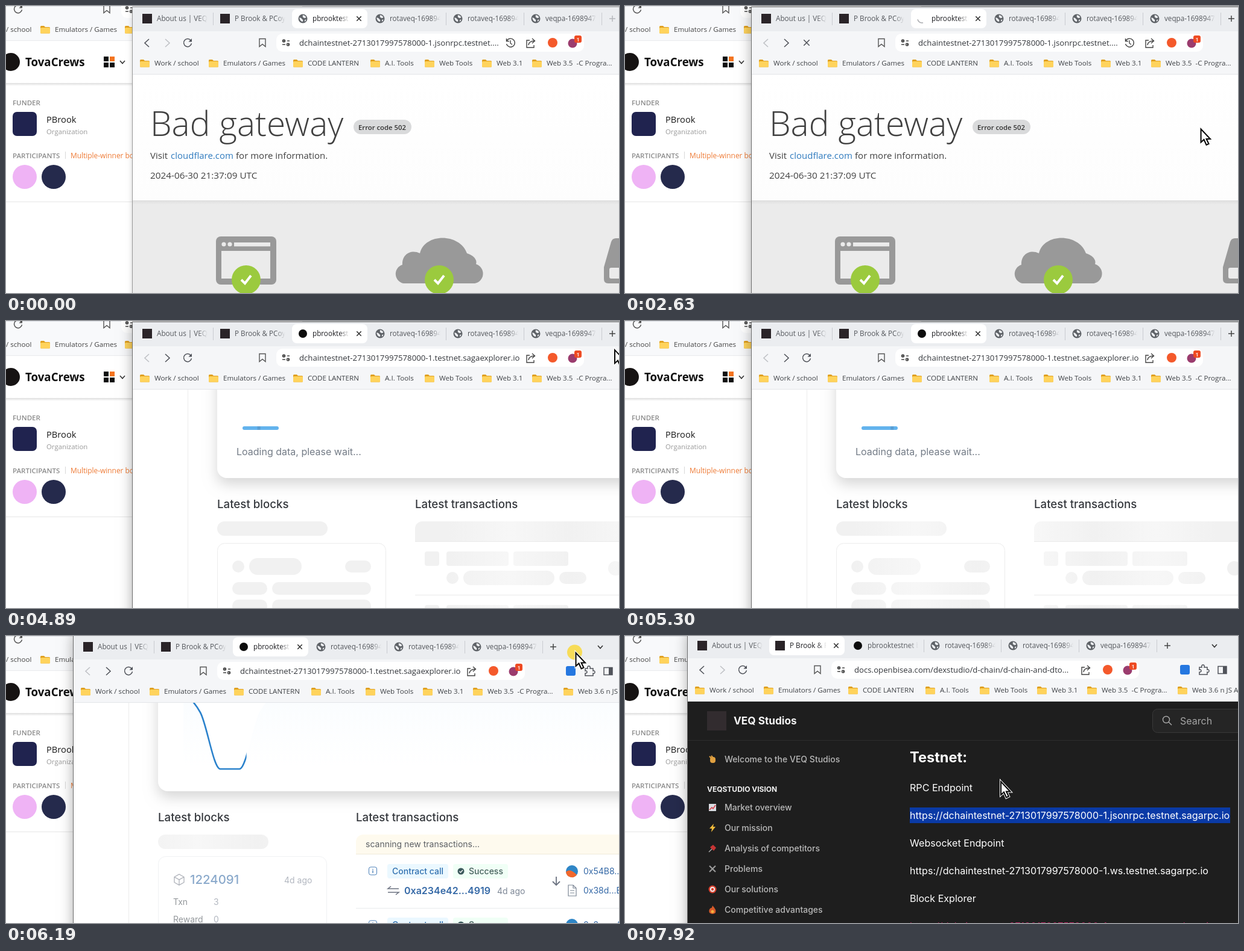
An HTML page with a canvas for the animation above (7990 ms loop, 1016 px wide and 477 px high).

```html
<!DOCTYPE html>
<html lang="en">
<head>
<meta charset="utf-8">
<title>Browser session</title>
<style>
html, body { margin: 0; width: 100%; height: 100%; overflow: hidden; background: #fff; }
canvas { display: block; width: 1016px; height: 477px; }
</style>
</head>
<body>
<canvas id="stage" width="1016" height="477"></canvas>
<script>
const ctx = document.getElementById('stage').getContext('2d');
const LOOP = 7990;
const UI = '"Open Sans", "Noto Sans", sans-serif';
const INTER = 'Inter, sans-serif';
const HOST = 'dchaintestnet-2713017997578000-1.';
const BACK_CLICK = 1330, EXPLORER = 4640, LOADED = 5760, DOCS = 7310;

// Keyframes: time, x, y
const DRAG = [[5340, 0, 0], [5600, -40, 0], [5840, -72, 0], [5905, -87, 0], [5980, -87, 0], [6350, -106, -5]];
const POINTER = [
  [190, 1040, 330], [930, 731, 268], [1290, 235, 62], [1400, 235, 62], [1525, 291, 98], [1600, 291, 98],
  [2100, 700, 268], [2500, 956, 240], [2800, 950, 150], [3410, 887, 201], [3805, 443, 82], [3880, 443, 82],
  [4100, 244, 140], [4300, 262, 150], [5000, 1060, 40], [5300, 1042, 30]];
const POINTER_LATE = [
  [6600, 936, 25], [6690, 880, 45], [7090, 308, 10], [7560, 308, 10],
  [7660, 234, 120], [7780, 400, 283], [7915, 622, 241]];

const clamp = v => Math.max(0, Math.min(1, v));
const ramp = (t, a, b) => clamp((t - a) / (b - a));

function track(keys, t) {
  if (t <= keys[0][0]) return keys[0].slice(1);
  for (let i = 1; i < keys.length; i++) {
    const [t0, x0, y0] = keys[i - 1], [t1, x1, y1] = keys[i];
    if (t < t1) {
      const p = (t - t0) / (t1 - t0), e = p * p * (3 - 2 * p);
      return [x0 + (x1 - x0) * e, y0 + (y1 - y0) * e];
    }
  }
  return keys[keys.length - 1].slice(1);
}

function rect(x, y, w, h, color) {
  ctx.fillStyle = color;
  ctx.fillRect(x, y, w, h);
}
function pill(x, y, w, h, r, color, border) {
  ctx.beginPath();
  ctx.roundRect(x, y, w, h, r);
  if (color) { ctx.fillStyle = color; ctx.fill(); }
  if (border) { ctx.strokeStyle = border; ctx.lineWidth = 1; ctx.stroke(); }
}
function dot(x, y, r, color) {
  ctx.beginPath();
  ctx.arc(x, y, r, 0, 7);
  ctx.fillStyle = color;
  ctx.fill();
}
function fill(d, color) {
  ctx.fillStyle = color;
  ctx.fill(new Path2D(d));
}
function stroke(d, color, width = 1.4) {
  ctx.strokeStyle = color;
  ctx.lineWidth = width;
  ctx.stroke(new Path2D(d));
}
function text(s, x, y, size, color, weight = 400, font = UI) {
  ctx.font = `${weight} ${size}px ${font}`;
  ctx.fillStyle = color;
  ctx.fillText(s, x, y);
}
const inter = (s, x, y, size, color, weight) => text(s, x, y, size, color, weight, INTER);
function at(x, y, draw) {
  ctx.save();
  ctx.translate(x, y);
  draw();
  ctx.restore();
}
function fade(y0, y1, from, to) {
  const g = ctx.createLinearGradient(0, y0, 0, y1);
  g.addColorStop(0, from);
  g.addColorStop(1, to);
  return g;
}

// Icons
const folder = (x, y) => at(x, y, () => {
  fill('M0 1.5Q0 0 1.5 0H6L8 2H14.5Q16 2 16 3.5V11Q16 12.5 14.5 12.5H1.5Q0 12.5 0 11Z', '#e0a020');
  pill(0, 3, 16, 9.5, 1.5, '#ffd35c');
});
const reload = (x, y, color) => at(x, y, () => {
  stroke('M5.5 -3.5A6.5 6.5 0 1 0 6.5 1.2', color, 1.5);
  fill('M7 -7V-1.5H1.5Z', color);
});
const bookmark = (x, y) => at(x, y, () => stroke('M-5 -6.5H5V6.5L0 2.5L-5 6.5Z', '#555'));
const tune = (x, y) => at(x, y, () => {
  stroke('M-6 -3H-2M2 -3H6M-6 3H-1M3 3H6', '#444', 1.5);
  ctx.beginPath();
  ctx.arc(-3.5, -3, 2, 0, 7);
  ctx.moveTo(5.5, 3);
  ctx.arc(3.5, 3, 2, 0, 7);
  ctx.stroke();
});
const globe = (x, y) => at(x, y, () => {
  dot(0, 0, 7.5, '#5f6368');
  fill('M-5.5 -2Q-2 -1 -1 1Q1 2 0 5Q-4 5 -5.5 0ZM0 -6Q4 -5.5 5.5 -2Q3 0 1.5 -1.5Q-1 -2 0 -6ZM3 2Q5 1 5.6 1.6Q5 4 3 5Z', '#eceef1');
});
const cross = (x, y, r, color) => at(x, y, () => stroke(`M${-r} ${-r}L${r} ${r}M${r} ${-r}L${-r} ${r}`, color, 1.6));
const plus = (x, y, color) => at(x, y, () => stroke('M-5 0H5M0 -5V5', color, 1.5));
const chevron = (x, y) => at(x, y, () => stroke('M-4 -2L0 2.5L4 -2', '#333', 1.6));

function backdrop() {
  rect(0, 0, 1016, 477, '#fff');
  rect(0, 0, 1016, 57, '#f8f9fb');
  rect(0, 0, 1016, 1, '#dfe2e6');
  pill(191, -10, 300, 30, 10, '#fff');
  reload(20, 5, '#555');
  bookmark(167, 5);
  tune(204, 6);
  text('/ school', 0, 43, 11.6, '#444');
  folder(57, 33);
  text('Emulators / Games', 81, 43, 11.6, '#444');
  folder(197, 33);
  rect(0, 128, 230, 5, fade(128, 133, 'rgba(0,0,0,.13)', 'rgba(0,0,0,0)'));
  rect(0, 57, 230, 71, '#fff');
  rect(0, 57, 230, 1, '#e9eaec');
  dot(8, 93, 15, '#161313');
  text('TovaCrews', 32, 100, 18.7, '#111', 700);
  for (let i = 0; i < 4; i++)
    rect(162 + (i % 2) * 10, 84 + (i >> 1) * 10, 8, 8, i === 1 ? '#f4741f' : '#111');
  chevron(193, 93);
  text('FUNDER', 11, 165, 11.5, '#8b8b8b', 600);
  pill(11, 176, 40, 40, 7, '#20234f');
  text('PBrook', 67, 194, 14.7, '#1a1a1a', 500);
  text('Organization', 67, 213, 11.4, '#999');
  text('PARTICIPANTS', 11, 253, 11.5, '#8b8b8b', 600);
  rect(98, 242, 1, 12, '#d8d8d8');
  text('Multiple-winner bounty', 107, 253, 11.9, '#ee7a35');
  dot(31, 284, 20, '#efb3f5');
  dot(79, 284, 20, '#252a4c');
  rect(0, 325, 230, 1, '#e6e6e6');
}

function tabs(t) {
  const titles = ['About us | VEQ Studios', 'P Brook & PCoyn', t < DOCS ? 'pbrooktestnet' : 'pbrooktestnet block',
    'rotaveq-1698947', 'rotaveq-1698947', 'veqpa-1698947'];
  const active = t < DOCS ? 2 : 1;
  const hover = t > 7040 && t < DOCS ? 1 : -1;
  const quiet = i => i !== active && i !== hover;
  titles.forEach((title, i) => {
    const x = Math.round(226 + 128.8 * i);
    if (!quiet(i)) pill(x - 10, 5, 125, 32, 8, i === active ? '#fff' : '#f5f6f8');
    if (i < 2) rect(x, 13, 16, 16, '#2a2428');
    else if (i === 2) siteIcon(t, x + 8);
    else globe(x + 8, 21);
    const end = x + (quiet(i) ? 108 : 85);
    const rgb = i === active ? '30,30,34' : '84,87,92';
    const g = ctx.createLinearGradient(end - 16, 0, end, 0);
    g.addColorStop(0, `rgb(${rgb})`);
    g.addColorStop(1, `rgba(${rgb},0)`);
    text(title, x + 24, 25, 11.7, g);
    if (!quiet(i)) cross(x + 101, 21, 3.7, '#333');
    if (quiet(i) && (i === 5 || quiet(i + 1))) rect(x + 117, 11, 1, 21, '#c9cbd0');
  });
  plus(1005, 21, t < 190 ? '#b5b7bb' : '#444');
  chevron(1083, 21);
}

function siteIcon(t, x) {
  if (t < BACK_CLICK) globe(x, 21);
  else if (t >= EXPLORER) dot(x, 21, 7, '#0c0c0c');
  else {
    const start = t / 190, span = 1.7 + 0.9 * Math.sin(t / 420);
    ctx.beginPath();
    ctx.arc(x, 21, 7, start, start + span);
    ctx.strokeStyle = '#a9abaf';
    ctx.lineWidth = 1.6;
    ctx.stroke();
  }
}

function toolbar(t) {
  const on = '#50535a', off = '#bfc1c5';
  const wentBack = t >= BACK_CLICK && t < DOCS;
  const loading = t >= BACK_CLICK && t < EXPLORER;
  if (t > 1240 && t < 1620) pill(218, 46, 30, 30, 6, '#d4d6da');
  stroke('M237 55L230 61.5L237 68', wentBack ? off : on, 1.6);
  stroke('M264 55L271 61.5L264 68', wentBack ? on : off, 1.6);
  if (loading) cross(301, 61, 4.7, on);
  else reload(301, 61, on);
  bookmark(425, 61);
  pill(448, 46, 510, 30, 10, '#fff');
  tune(464, 61);
  const address = t < EXPLORER ? HOST + 'jsonrpc.testnet....'
    : t < DOCS ? HOST + 'testnet.sagaexplorer.io'
    : 'docs.openbisea.com/dexstudio/d-chain/d-chain-and-dto...';
  text(address, 486, 66, 13.2, '#33363b');
  if (t < EXPLORER) stroke('M830 58A7 7 0 1 1 829.500 63M829.500 54V58.500H834M836 57V62L839 64', '#444');
  stroke('M868 57H863V69H875V65M866 65Q867 58 876 58M872 54L876.500 58L872 62', '#444');
  dot(906, 61, 8, '#f4592b');
  dot(939, 62, 7.5, '#9b3c6e');
  pill(942, 49, 12, 12, 3, '#ee4b23');
  text('1', 945.5, 58.5, 9, '#fff', 600);
  pill(1026, 53, 16, 16, 3, '#2577e0');
  stroke('M1058 57H1062Q1061 53 1064 53Q1067 53 1066 57H1071V61Q1074 60 1074 63Q1074 66 1071 65V69H1058V65Q1061 65 1061 63Q1061 60 1058 61Z', '#50535a', 1.5);
  stroke('M1089 55.500H1103V67.500H1089Z', '#50535a', 1.5);
  rect(1097, 55, 6, 13, '#50535a');
  const marks = [[222, 'Work / school'], [336, 'Emulators / Games'], [476, 'CODE LANTERN'], [604, 'A.I. Tools'],
    [694, 'Web Tools'], [789, 'Web 3.1'], [872, 'Web 3.5  -C Progra...'], [1022, 'Web 3.6 n JS Apps']];
  for (const [x, name] of marks) {
    folder(x, 89);
    text(name, x + 24, 99, 11.6, '#3f4246');
  }
}

function check(x) {
  dot(x, 455, 24, '#9bca3e');
  stroke(`M${x - 8} 455L${x - 2} 461L${x + 8} 448`, '#fff', 4);
}

function gatewayPage() {
  const gray = '#999', ground = '#ebebeb';
  rect(210, 114, 900, 209, fade(114, 323, '#fff', '#fdfdfd'));
  text('Bad gateway', 239, 216, 56.8, '#404040', 300);
  pill(576, 189, 96, 24, 12, '#d9dadb');
  text('Error code 502', 584, 206, 11.3, '#313131', 600);
  text('Visit ', 239, 254, 15, '#404040');
  text('cloudflare.com', 273, 254, 15, '#2f7bbf');
  text('for more information.', 381, 254, 15, '#404040');
  text('2024-06-30 21:37:09 UTC', 239, 287, 15.3, '#404040');
  rect(210, 323, 900, 160, ground);
  rect(210, 323, 900, 7, fade(323, 330, '#dedede', ground));
  pill(348, 383, 100, 80, 8, gray);
  dot(361, 396, 3.6, ground);
  dot(371, 396, 3.6, ground);
  rect(378, 393, 60, 6.5, ground);
  rect(357, 407, 81, 46, ground);
  check(398);
  fill('M659 461A16 16 0 0 1 657 430C656 412 672 404 686 411C694 377 752 377 764 411C779 416 781 425 779 429A16.500 16.500 0 0 1 777 461Z', gray);
  check(718);
  fill('M991 434L1003 392Q1005 386 1011 386H1080V461H998Q991 461 991 454Z', gray);
  pill(1000, 435, 80, 18, 3, ground);
}

function skeleton(t, parts) {
  const shift = (t % 1000) / 1000 * 600;
  const g = ctx.createLinearGradient(200 + shift, 0, 800 + shift, 0);
  for (let i = 0; i <= 6; i++) g.addColorStop(i / 6, i % 2 ? '#f7f7f7' : '#f1f1f1');
  for (const [x, y, w, h, r] of parts) pill(x, y, w, h, r ?? h / 2, g);
}

function chart(t) {
  const dip = 'M389 98C399 102 410 112 420 130C431 150 442 224 453 224H485C496 224 507 150 518 130C528 112 539 102 549 98';
  ctx.save();
  ctx.beginPath();
  ctx.rect(392, 114, 740, 146);
  ctx.clip();
  ctx.globalAlpha = ramp(t, 6150, 6700);
  fill(`${dip}H1130V224H389Z`, fade(102, 222, 'rgba(190,224,248,1)', 'rgba(190,224,248,0)'));
  ctx.globalAlpha = 1;
  const reach = track([[LOADED, 396, 0], [5905, 450, 0], [5980, 450, 0], [6450, 560, 0]], t)[0];
  ctx.beginPath();
  ctx.rect(390, 100, reach - 390, 140);
  ctx.clip();
  stroke(dip, '#2b82cc', 2.6);
  ctx.restore();
}

function transaction(y, hash, from, to) {
  pill(699.5, y - 7, 13, 13, 3, null, '#4a7fb8');
  rect(705.3, y - 1.5, 1.4, 4.5, '#4a7fb8');
  rect(705.3, y - 4, 1.4, 1.4, '#4a7fb8');
  pill(730, y - 12, 101, 24, 4, '#ebf8ff');
  inter('Contract call', 738, y + 5, 14, '#2f70b0', 500);
  pill(839, y - 12, 91, 24, 4, '#f0fff6');
  dot(852, y, 5.5, '#3c5a5c');
  stroke(`M849.500 ${y}L851.500 ${y + 2}L855 ${y - 2}`, '#fff', 1.2);
  inter('Success', 865, y + 5, 14, '#45605c', 500);
  stroke(`M1010 ${y + 9}V${y + 23}M1004 ${y + 17}L1010 ${y + 23}L1016 ${y + 17}`, '#6b7280', 1.8);
  stroke(`M749 ${y + 29}H731L736 ${y + 25}M731 ${y + 35}H749L744 ${y + 39}`, '#6b7280', 1.5);
  inter(hash, 758, y + 38, 16, '#3468a6', 600);
  inter('4d ago', 912, y + 38, 14, '#7d8796');
  dot(1036, y, 10, '#2f86c6');
  fill(`M1026 ${y + 1}Q1033 ${y - 6} 1044 ${y + 6}A10 10 0 0 1 1026 ${y + 1}Z`, '#f2682c');
  inter(from, 1055, y + 5, 14, '#3468a6');
  stroke(`M1030 ${y + 23}H1038L1043 ${y + 28}V${y + 41}H1030ZM1038 ${y + 23}V${y + 28}H1043M1033 ${y + 32}H1040M1033 ${y + 36}H1040`, '#7b8594', 1.2);
  inter(to, 1055, y + 37, 14, '#3468a6');
  rect(678, y + 61, 450, 1, '#e8eaed');
}

function blockCard(t) {
  ctx.globalAlpha = ramp(t, 5885, 6400);
  pill(350.5, 369.5, 279, 160, 12, '#fff', '#e6e8eb');
  stroke('M385 399L393 403.500V412.500L385 417L377 412.500V403.500ZM377 403.500L385 408L393 403.500M385 408V417', '#6b7280', 1.2);
  inter('1224091', 403, 415, 20.4, '#3a6ea8', 500);
  inter('4d ago', 559, 414, 14, '#7d8796');
  inter('Txn', 375, 450, 14, '#4a5058');
  inter('3', 442, 450, 14, '#7d8796');
  inter('Reward', 375, 479, 14, '#4a5058');
  inter('0', 442, 479, 14, '#7d8796');
  ctx.globalAlpha = 1;
}

function explorerPage(t) {
  const ready = t >= LOADED;
  rect(210, 114, 930, 370, '#fff');
  rect(301, 114, 1, 370, '#ececec');
  ctx.save();
  ctx.beginPath();
  ctx.rect(302, 114, 830, 370);
  ctx.clip();
  ctx.shadowColor = 'rgba(0,0,0,.16)';
  ctx.shadowBlur = 22;
  ctx.shadowOffsetY = 10;
  pill(350, 60, 900, 201, 16, '#fff');
  ctx.restore();
  if (ready) chart(t);
  else {
    pill(392, 175, 60, 6, 3, '#63b3ed');
    rect(394 + (t % 900) / 900 * 52, 175, 5, 6, '#5a9fd4');
    inter('Loading data, please wait...', 382, 223, 16, '#737b86');
  }
  inter('Latest blocks', 350, 311, 18.7, '#35383d', 500);
  inter('Latest transactions', 678, 311, 18.7, '#35383d', 500);

  if (t < 6740) skeleton(t, [[350, 333, 183, 24]]);
  else {
    inter('Network utilization:', 350, 351, 14, '#5b626c');
    inter('0.97%', 482, 351, 14, '#4594d6', 700);
  }
  if (ready) {
    blockCard(t);
    pill(678, 333, 450, 33, [12, 12, 0, 0], '#fefaee');
    rect(678, 365, 450, 1, '#f0ead9');
    inter('scanning new transactions...', 694, 354, 14, '#5d6166');
    transaction(394, '0xa234e42...4919', '0x54B8...9a1C', '0x38d...Eb42');
    transaction(483, '0x71c90d5...b20e', '0x2ec...44A7', '0x38d...Eb42');
  } else {
    pill(350.5, 369.5, 279, 160, 12, '#fff', '#ececec');
    skeleton(t, [[375, 398, 20, 20], [403, 394, 87, 28], [562, 398, 43, 20], [375, 434, 58, 21], [441, 434, 164, 21],
      [375, 463, 58, 21], [441, 463, 164, 21], [678, 333, 450, 33, [12, 12, 0, 0]],
      [730, 417, 20, 20], [758, 415, 151, 24], [917, 417, 45, 20], [998, 399, 24, 24]]);
    for (const y of [383, 472]) {
      skeleton(t, [[694, y, 24, 24, 4], [730, y, 103, 24, 4], [841, y, 91, 24, 4]]);
      rect(678, y - 17, 450, 1, '#e9e9e9');
    }
  }
}

const SIDE_ICONS = [
  () => { pill(-4, -4, 9, 10, 4, '#e0a040'); stroke('M-5 -5L1 1M-2 -6L3 0', '#e0a040', 2); },
  () => { rect(-6, -6, 12, 12, '#d9dde2'); stroke('M-5 4L-1 0L1 2L5 -4', '#d8434f', 1.6); },
  () => fill('M2 -7L-5 1H-1L-2 7L5 -2H1Z', '#f0b93a'),
  () => { stroke('M-6 6L0 0', '#aaa', 1.4); fill('M-4 -2L1 -6L6 -1L2 4Z', '#c93434'); },
  () => stroke('M-5 -5L5 5M5 -5L-5 5', '#9a9a9a', 2.2),
  () => { dot(0, 0, 6.5, '#d8412f'); dot(0, 0, 4.2, '#eee'); dot(0, 0, 2.2, '#d8412f'); },
  () => { fill('M0 -7Q7 0 5 5Q0 9 -5 5Q-7 0 -3 -3Q-1 -2 0 -7Z', '#d65a2a'); dot(0, 3, 2.5, '#f4b13d'); }
];

function docsPage() {
  const soft = '#b9b9b9';
  rect(210, 114, 930, 370, '#1e1e1e');
  rect(210, 178, 930, 1, '#2d2d2d');
  rect(242, 130, 32, 32, '#322c2f');
  inter('VEQ Studios', 286, 152, 17.2, '#f4f4f4', 700);
  pill(980.5, 126.5, 200, 39, 8, '#252525', '#393939');
  ctx.beginPath();
  ctx.arc(1003, 144, 5.5, 0, 7);
  ctx.strokeStyle = '#aaa';
  ctx.lineWidth = 1.4;
  ctx.stroke();
  stroke('M1007 148L1012 153', '#aaa');
  inter('Search', 1026, 152, 16, '#a5a5a5');

  const items = ['Welcome to the VEQ Studios', 'Market overview', 'Our mission', 'Analysis of competitors',
    'Problems', 'Our solutions', 'Competitive advantages'];
  items.forEach((name, i) => {
    const y = i ? 256 + 34 * i : 210;
    at(251, y, SIDE_ICONS[i]);
    inter(name, 271, y + 5, 14, soft, 500);
  });
  inter('VEQSTUDIO VISION', 242, 263.5, 12, '#f2f2f2', 700);

  inter('Testnet:', 578, 215, 23.6, '#fff', 700);
  rect(578, 290, 531, 26, '#0a3aa6');
  const lines = ['RPC Endpoint', `https://${HOST}jsonrpc.testnet.sagarpc.io`, 'Websocket Endpoint',
    `https://${HOST}ws.testnet.sagarpc.io`, 'Block Explorer'];
  lines.forEach((s, i) => inter(s, 578, 263 + 46 * i, 16.1, '#fff'));
  inter(`https://${HOST}testnet.sagaexplorer.io`, 578, 493, 16.1, '#c02668');
}

function browser(t) {
  const focused = t >= 190;
  ctx.save();
  ctx.shadowColor = focused ? 'rgba(0,0,0,.32)' : 'rgba(0,0,0,.18)';
  ctx.shadowBlur = focused ? 20 : 8;
  rect(209, 1, 940, 540, focused ? '#6d6d6d' : '#9a9a9a');
  ctx.restore();
  rect(210, 2, 930, 40, '#ebedf0');
  rect(210, 42, 930, 71, '#f5f6f8');
  rect(210, 113, 930, 1, '#e3e5e8');
  tabs(t);
  toolbar(t);
  if (t < EXPLORER) gatewayPage();
  else if (t < DOCS) explorerPage(t);
  else docsPage();
}

function pointer(t, dx, dy) {
  if (t < 190) return;
  const [x, y] = t < 5300 ? track(POINTER, t) : t < 6600 ? [1042 + dx, 30 + dy] : track(POINTER_LATE, t);
  const pressed = (t > 1310 && t < 1400) || (t > 5320 && t < 6600) || (t > 7305 && t < 7375);
  at(x, y, () => {
    if (pressed) dot(-1, 0, 12.5, 'rgba(250,215,50,.8)');
    const arrow = 'M1 1V23L6 18.500L10 27.500L14 25.500L10 17.500H16.500Z';
    stroke(arrow, '#fff', 4);
    fill(arrow, '#fff');
    stroke(arrow, '#000', 2);
  });
}

function frame(now) {
  const t = now % LOOP;
  const [dx, dy] = track(DRAG, t);
  backdrop();
  at(Math.round(dx), Math.round(dy), () => browser(t));
  pointer(t, dx, dy);
  requestAnimationFrame(frame);
}
requestAnimationFrame(frame);
</script>
</body>
</html>
```
